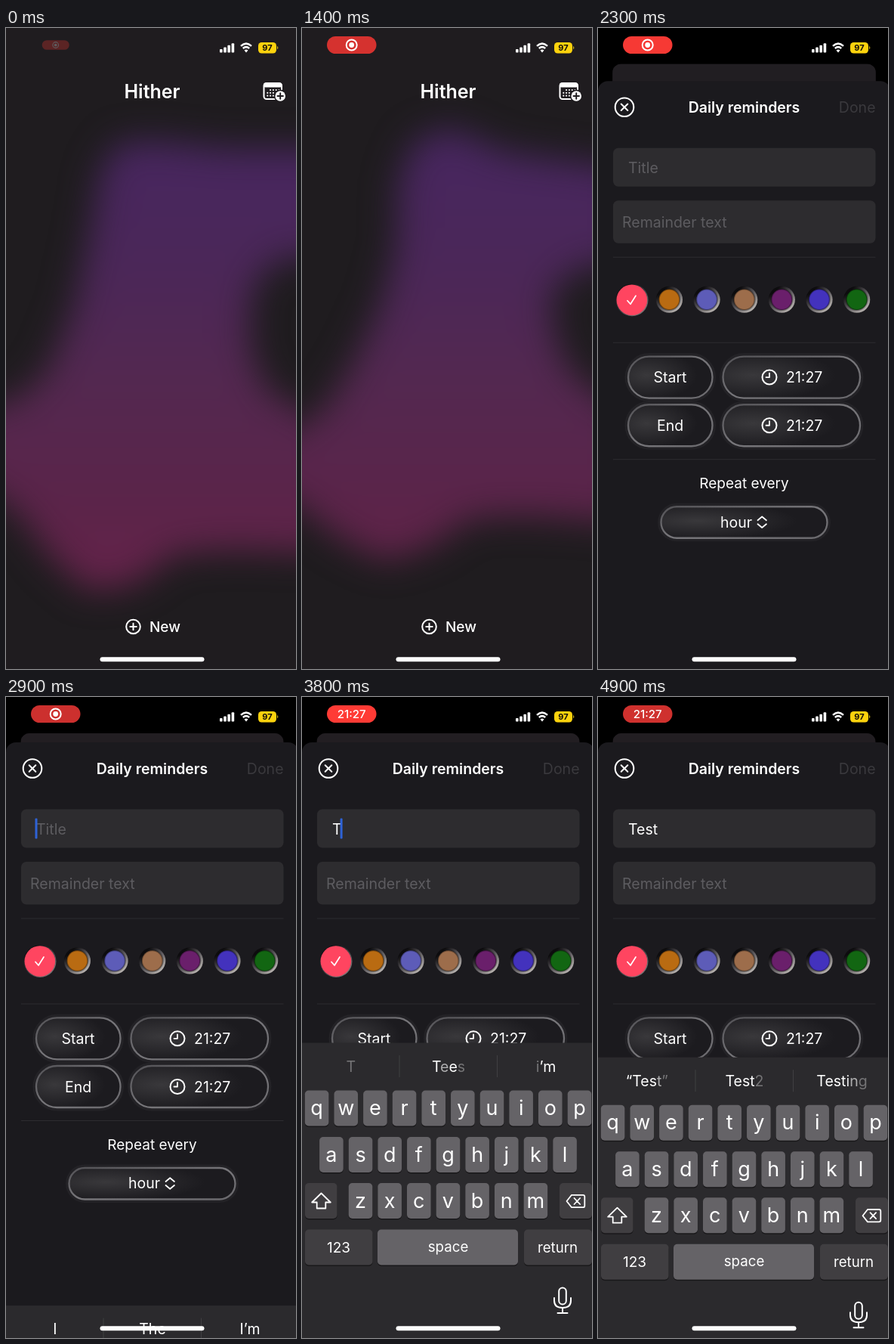
Animation, 384 px wide and 848 px high, one loop 5000 ms. Source, as an HTML page:

```html
<!DOCTYPE html>
<html lang="en">
<head>
<meta charset="utf-8">
<title>Daily reminders</title>
<style>
  html, body { margin: 0; width: 100%; height: 100%; overflow: hidden; background: #000; }
  svg { display: block; width: 100%; height: 100%; }
  text { font-family: Inter, Roboto, "Liberation Sans", sans-serif; font-size: 19.5px; fill: #fff; white-space: pre; }
  .mid { text-anchor: middle; }
  .line { fill: none; stroke: #fff; stroke-width: 2; stroke-linecap: round; stroke-linejoin: round; }
  .hint { fill: #5d5c60; }
</style>
</head>
<body>
<svg id="stage" viewBox="0 0 384 848">
  <defs>
    <linearGradient id="dusk" gradientUnits="userSpaceOnUse" x1="0" y1="150" x2="0" y2="720">
      <stop offset="0" stop-color="#47265f"/>
      <stop offset=".3" stop-color="#4b2758"/>
      <stop offset=".55" stop-color="#532850"/>
      <stop offset=".85" stop-color="#5b2449"/>
      <stop offset="1" stop-color="#64234a"/>
    </linearGradient>
    <linearGradient id="metal" x1=".15" y1=".1" x2=".85" y2=".9">
      <stop offset=".1" stop-color="#0d0c0e"/>
      <stop offset=".5" stop-color="#59565a"/>
      <stop offset="1" stop-color="#bdb8b4"/>
    </linearGradient>
    <linearGradient id="rim" x1="0" y1="0" x2="1" y2="1">
      <stop offset="0" stop-color="#525155"/>
      <stop offset=".5" stop-color="#77767a"/>
      <stop offset="1" stop-color="#6a696d"/>
    </linearGradient>
    <radialGradient id="sheen" cx=".22" cy=".45" r=".6">
      <stop offset="0" stop-color="#39383b"/>
      <stop offset="1" stop-color="#1c1b1f"/>
    </radialGradient>
    <filter id="soft" filterUnits="userSpaceOnUse" x="-140" y="0" width="680" height="848" color-interpolation-filters="sRGB">
      <feGaussianBlur stdDeviation="23"/>
    </filter>
    <clipPath id="cardClip"><rect id="cardShape" width="387" height="848"/></clipPath>
  </defs>
</svg>
<script>
const LOOP = 5000, STEP = 100;
const SHEET_IN = 1940, KEYS_IN = 2868, KEYS_OUT = 4880, SHOW_CLOCK = 3100;
const SHEET_TRAVEL = 788, KEYS_TRAVEL = 390.5;

// Outline of the glow: two full poses, then a change to the top part.
const poseA = [-60,505, 10,495, 55,455, 90,370, 112,270, 125,190, 150,152, 200,150,
  290,160, 440,160, 440,300, 360,305, 325,345, 322,420, 345,480, 440,530,
  440,695, 300,690, 225,695, 170,735, 110,745, 60,700, 15,640, -60,590];
const poseB = [-60,560, 30,505, 70,440, 105,365, 125,290, 128,200, 150,150, 195,132,
  270,165, 440,188, 440,305, 365,318, 328,350, 335,410, 355,455, 440,520,
  440,655, 300,645, 225,648, 170,685, 110,705, 50,675, 0,635, -60,600];
const poseC = poseB.slice();
poseC.splice(8, 14, 80,290, 75,205, 120,150, 195,120, 270,150, 310,200, 320,300);

const typing = [
  { at: 0, text: "", words: ["I", "The", "I’m"] },
  { at: 3700, text: "T", words: ["T", "Tees", "i’m"] },
  { at: 4100, text: "Te", words: ["“Te”", "Tell", "Tea"] },
  { at: 4400, text: "Tes", words: ["“Tes”", "Test", "Tests"] },
  { at: 4800, text: "Test", words: ["“Test”", "Test2", "Testing"] }
];
const swatches = ["#b96b12", "#5d5cb8", "#9d6d4b", "#6a1f6b", "#4332bd", "#126612"];

const clamp = v => Math.max(0, Math.min(1, v));
const mix = (a, b, k) => a + (b - a) * k;
const $ = id => document.getElementById(id);

// Remaining distance of a critically damped spring, 1 to 0.
function rest(t, start) {
  const x = Math.max(0, t - start) * 0.0176;
  return (1 + x) * Math.exp(-x);
}

const label = (x, y, s, extra = "") => `<text x="${x}" y="${y}" ${extra}>${s}</text>`;
const centred = (x, y, s, size = 19.5, extra = "") =>
  label(x, y, s, `class="mid" style="font-size:${size}px" ${extra}`);
const box = (x, y, w, h, r, fill, extra = "") =>
  `<rect x="${x}" y="${y}" width="${w}" height="${h}" rx="${r}" fill="${fill}" ${extra}/>`;
const disc = (x, y, r, fill, extra = "") => `<circle cx="${x}" cy="${y}" r="${r}" fill="${fill}" ${extra}/>`;
const line = (d, extra = "") => `<path class="line" d="${d}" ${extra}/>`;
const ring = (x, y, r) => `<circle class="line" cx="${x}" cy="${y}" r="${r}"/>`;

function calendarIcon() {
  let dots = "";
  for (let row = 0; row < 3; row++)
    for (let col = 0; col < 5; col++)
      if (row || col) dots += disc(346.3 + col * 3.8, 82 + row * 3.8, 1.1, "#fff");
  return box(341.5, 73, 23.5, 21, 3.5, "none", 'stroke="#fff" stroke-width="2"') +
    box(341, 72.5, 24.5, 6, 2.5, "#fff") + dots +
    disc(363.2, 90, 8.4, "#1f1c1f") + disc(363.2, 90, 6.8, "#fff") +
    line("M359.5 90h7.4M363.2 86.3v7.4", 'style="stroke:#1f1c1f"');
}

function home() {
  return `<g id="card" clip-path="url(#cardClip)">
    ${box(0, 0, 387, 848, 0, "#1f1c1f")}
    <polygon id="glow" fill="url(#dusk)" filter="url(#soft)"/>
    ${centred(193.5, 93, "Hither", 25, 'font-weight="600"')}
    ${calendarIcon()}
    ${ring(168.5, 792, 9.3)}${line("M164.3 792h8.4M168.5 787.8v8.4")}
    ${label(190, 798.7, "New", 'font-weight="500" style="font-size:19px"')}
    <rect id="dim" width="387" height="848" fill="#262328"/>
  </g>`;
}

const pill = (x, y, w, h) =>
  box(x, y, w, h, h / 2, "none", 'stroke="#fff" stroke-opacity=".035" stroke-width="9"') +
  box(x, y, w, h, h / 2, "url(#sheen)", 'stroke="url(#rim)" stroke-width="2.3"');

function timeRow(name, y) {
  return pill(40, y - 27.5, 111.5, 55) + pill(165.5, y - 27.5, 181.5, 55) +
    centred(95.5, y + 7, name) +
    ring(227, y, 9.5) + line(`M227 ${y - 5.5}v5.5h-4.5`, 'style="stroke-width:1.8"') +
    label(249, y + 7, "21:27");
}

function sheet() {
  const dots = swatches.map((c, i) => {
    const x = 94.4 + i * 49.65;
    return disc(x, 349, 17.6, "url(#metal)") +
      disc(x, 349, 13.8, c, 'stroke="#000" stroke-opacity=".35" stroke-width="2"');
  }).join("");
  const rules = [293, 406, 560.5].map(y => box(20, y - .5, 347.5, 1, 0, "#2d2c30")).join("");
  return `<g id="sheet">
    ${box(0, 60, 387, 900, 13, "#1b1a1e")}
    ${ring(35, 94.5, 12.3)}${line("M30.7 90.2l8.6 8.6M39.3 90.2l-8.6 8.6")}
    ${centred(193.5, 101.5, "Daily reminders", 19.5, 'font-weight="600"')}
    ${label(367.5, 101.5, "Done", 'text-anchor="end" style="fill:#3a393d"')}
    ${box(20, 148.5, 347.5, 51, 7, "#2d2c2f")}
    ${box(20, 218, 347.5, 56.5, 7, "#2d2c2f")}
    ${label(40, 182, "Title", 'class="hint" id="hint"')}
    ${label(40, 182, "", 'id="entry"')}
    <rect id="caret" y="160.5" width="3" height="27" rx="1" fill="#2e62d6"/>
    ${label(32, 254, "Remainder text", 'class="hint"')}
    ${rules}
    ${disc(45, 349.5, 21.5, "url(#metal)", 'opacity=".6"')}${disc(44.8, 349.5, 20.3, "#ff4560")}
    ${line("M39 350.5l4 4.5l7-11", 'style="stroke-width:1.7"')}
    ${dots}
    ${timeRow("Start", 451.8)}${timeRow("End", 515.5)}
    ${centred(193.5, 599, "Repeat every", 19)}
    ${pill(83.5, 623, 220, 41.5)}
    ${label(162, 650.3, "hour")}
    ${line("M211.5 641l5.7-4.7l5.7 4.7M211.5 646l5.7 4.7l5.7-4.7", 'style="stroke-width:1.8"')}
  </g>`;
}

const key = (x, y, w, fill, id = "") =>
  box(x, y + 1.5, w, 47, 5, "#19181a") + box(x, y, w, 47, 5, fill, id);

function keyboard() {
  const PLAIN = "#656367", SPECIAL = "#403e41", PITCH = 38.65;
  const rows = [["QWERTYUIOP", 19.6, 520.5], ["ASDFGHJKL", 38.9, 582], ["ZXCVBNM", 77.5, 643]];
  const letters = rows.map(([chars, x0, y]) => [...chars].map((c, i) => {
    const x = x0 + i * PITCH;
    return key(x - 15.8, y, 31.6, PLAIN) + centred(x, y + 32.5, c, 25, 'data-key');
  }).join("")).join("");
  return `<g id="keys">
    ${box(0, 457.5, 387, 420, 0, "#2b2a2d")}
    ${box(128.5, 474, 1, 29, 0, "#414043")}${box(258, 474, 1, 29, 0, "#414043")}
    ${[64.8, 194, 323].map(x => centred(x, 495.7, "", 19.5, "data-word")).join("")}
    ${letters}
    ${key(4, 643, 42.5, SPECIAL, 'id="shiftKey"')}
    <path id="shiftIcon" d="M25.5 656.5L37.8 668.5H31.3V676.5H19.7V668.5H13.2Z" stroke-width="1.8" stroke-linejoin="round"/>
    ${key(341, 643, 43, SPECIAL)}
    ${line("M350.5 667l6.5-8.2h15q2.3 0 2.3 2.3v11.8q0 2.3-2.3 2.3h-15zM360.5 663l7.6 8M368.1 663l-7.6 8", 'style="stroke-width:1.8"')}
    ${key(4, 704.5, 89.5, SPECIAL)}${centred(48.5, 734.7, "123", 19)}
    ${key(100, 704.5, 186, PLAIN)}${centred(193.5, 733.7, "space", 18.7)}
    ${key(294, 704.5, 90, SPECIAL)}${centred(338.5, 734.5, "return", 18.7)}
    <rect class="line" x="340.2" y="781.5" width="9.6" height="22" rx="4.8"/>
    ${line("M334 795v3.5q0 9.5 11 9.5t11-9.5v-3.5M345 808v7M338.5 815h13")}
  </g>`;
}

function statusBar() {
  const bars = [0, 1, 2, 3].map(i => box(283 + i * 5.2, 28 - i * 2.6, 3.6, 4.5 + i * 2.6, 1, "#fff")).join("");
  const wifi = [["M311 23.8q7-6.4 14 0", 2.5], ["M313.8 27q4.2-3.7 8.4 0", 2.5]]
    .map(([d, w]) => line(d, `style="stroke-width:${w};stroke-linecap:butt"`)).join("");
  return `<g id="rec">
      <rect id="recShape" x="33" y="11" width="65.5" height="23" rx="11.5"/>
      <g id="recDot">${ring(65.7, 22.5, 7)}${disc(65.7, 22.5, 3.4, "#fff")}</g>
      ${centred(65.7, 28, "21:27", 15, 'id="recTime" font-weight="500"')}
    </g>
    ${bars}${wifi}<path d="M315.5 29.5q2.5-2 5 0l-2.5 3z" fill="#fff"/>
    ${box(334, 19, 24, 14.5, 4.5, "#fcd20d")}
    <path d="M359.2 23.8q2.2 2.4 0 4.8z" fill="#fcd20d"/>
    ${centred(346, 30.2, "97", 11, 'font-weight="700" style="fill:#17140a"').replace('style="font-size:11px" ', "")}
    ${box(124.5, 832.3, 138, 6, 3, "#fff")}`;
}

const stage = $("stage");
stage.insertAdjacentHTML("beforeend", box(0, 0, 384, 848, 0, "#000") + home() + sheet() + keyboard() + statusBar());
stage.querySelectorAll('text[font-weight="700"]').forEach(e => { e.style.fontSize = "11px"; });
const keyTexts = [...stage.querySelectorAll("[data-key]")];
const wordTexts = [...stage.querySelectorAll("[data-word]")];
const set = (id, attrs) => { for (const k in attrs) $(id).setAttribute(k, attrs[k]); };
const show = (id, on) => set(id, { visibility: on ? "visible" : "hidden" });

function drawGlow(t) {
  const late = t > 1400;
  const from = late ? poseB : poseA, to = late ? poseC : poseB;
  const k = late ? clamp((t - 1400) / 700) : t / 1400;
  set("glow", { points: from.map((v, i) => mix(v, to[i], k).toFixed(2)).join(" ") });
}

function drawRecorder(t) {
  const k = 1 - (1 - clamp(t / 300)) ** 2, s = mix(.55, 1, k);
  const beat = .5 - .5 * Math.cos((t - 2950) / 1800 * 2 * Math.PI);
  set("rec", { transform: `translate(65.7 22.5) scale(${s}) translate(-65.7 -22.5)`, opacity: mix(.28, 1, k) });
  set("recShape", { fill: `rgb(${mix(204, 255, beat)},${mix(48, 59, beat)},${mix(46, 53, beat)})` });
  show("recDot", t < SHOW_CLOCK);
  show("recTime", t >= SHOW_CLOCK);
}

// Changed glyphs fade in, the earlier ones first.
function fadeWord(word, old, age) {
  let rank = [...word].filter((c, i) => c !== old[i]).length;
  return [...word].map((c, i) => {
    const o = c === old[i] ? 1 : clamp((.08 + .27 * rank--) * age / 100);
    return `<tspan fill-opacity="${o}">${c}</tspan>`;
  }).join("");
}

function drawTyping(t) {
  const n = typing.filter(s => s.at <= t).length - 1;
  const now = typing[n], before = typing[Math.max(0, n - 1)], upper = n === 0;
  $("entry").textContent = now.text;
  show("hint", upper);
  show("caret", t >= 2800 && t < KEYS_OUT);
  set("caret", { x: 38.5 + (now.text ? $("entry").getComputedTextLength() - .5 : 0) });
  wordTexts.forEach((e, i) => { e.innerHTML = fadeWord(now.words[i], before.words[i], t - now.at); });
  keyTexts.forEach(e => {
    e.textContent = upper ? e.textContent.toUpperCase() : e.textContent.toLowerCase();
    e.style.fontSize = upper ? "25px" : "27px";
  });
  set("shiftKey", { fill: upper ? "#d5d3d7" : "#403e41" });
  set("shiftIcon", { fill: upper ? "#000" : "none", stroke: upper ? "#000" : "#fff" });
}

function draw(t) {
  const away = rest(t, SHEET_IN), p = 1 - away;
  set("card", { transform: `translate(${19.35 * p} ${48 * p}) scale(${1 - .1 * p})` });
  set("cardShape", { rx: 13 * clamp(p * 4) });
  set("dim", { opacity: .42 * p });
  set("sheet", { transform: `translate(0 ${SHEET_TRAVEL * away})` });
  const down = t < KEYS_OUT ? rest(t, KEYS_IN) : 1 - rest(t, KEYS_OUT);
  set("keys", { transform: `translate(0 ${KEYS_TRAVEL * down})` });
  drawGlow(t);
  drawRecorder(t);
  drawTyping(t);
}

let last = -1;
const begin = performance.now();
function tick() {
  const t = Math.floor((performance.now() - begin) % LOOP / STEP) * STEP;
  if (t !== last) draw(last = t);
  requestAnimationFrame(tick);
}
tick();
</script>
</body>
</html>
```
